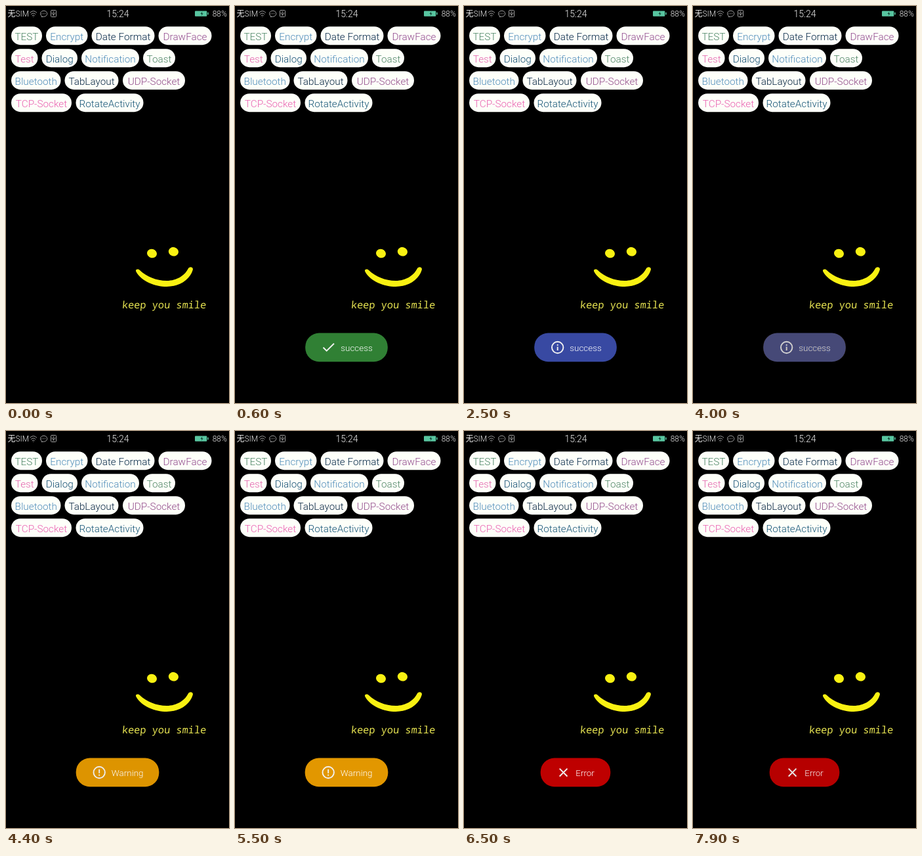
An HTML page for the animation above (8000 ms loop, 340x604 px).

```html
<!DOCTYPE html>
<html lang="en">
<head>
<meta charset="utf-8">
<title>Toast demo</title>
<style>
  html, body { margin: 0; width: 100%; height: 100%; overflow: hidden; background: #000; }
  svg { display: block; width: 340px; height: 604px; font-family: Roboto, "Noto Sans CJK SC", "Noto Sans CJK", sans-serif; font-weight: 300; }
  #chips { font-size: 15.3px; text-anchor: middle; }
  #chips rect { fill: #fdfff9; }
  .status { fill: #f0f0f0; font-size: 12px; }
  .icons { fill: none; stroke: #a0a0a0; stroke-linecap: round; }
  .motto { font: 500 15.3px "Noto Sans Mono", "DejaVu Sans Mono", monospace; fill: #e8e552; }
  .toast { opacity: 0; font-size: 13.4px; }
  .toast text { fill: #fff; }
  .toast path, .toast circle { fill: none; stroke: #f2f2f2; stroke-width: 1.9; }
</style>
</head>
<body>
<svg viewBox="0 0 340 604">
  <rect width="340" height="604"/>

  <g class="status">
    <text x="2.5" y="16.2">无SIM</text>
    <text x="170.5" y="17" font-size="14" text-anchor="middle">15:24</text>
    <text x="314.7" y="16.4">88%</text>
  </g>
  <g class="icons">
    <path d="M36.7 10q5-5 10 0M38.4 12.4q3.3-3 6.6 0M40.1 14.6q1.6-1.4 3.2 0M41.7 16.4h.01"/>
    <path d="M54.6 15.4a5.2 4.5 0 1 1 2.7.8l-2.9.3z"/>
    <path d="M54.8 11.7h.01M57.3 11.7h.01M59.8 11.7h.01" stroke-width="1.2"/>
    <rect x="68.5" y="6.5" width="8" height="10" rx="1"/>
    <path d="M72.5 8.5v6M70.5 10.5v1.5l2 1.3 2-1.3v-1.5" stroke-width=".9"/>
  </g>
  <rect x="288" y="7.4" width="18.3" height="8.4" rx="1" fill="#58c5a0"/>
  <rect x="307.2" y="9.7" width="1.5" height="3.6" fill="#58c5a0"/>
  <path d="M299.400 8.400l-2.900 3.500h2l-.7 2.900 2.900-3.500h-2z" fill="#0c3a2e"/>

  <g id="chips"></g>

  <g fill="#f9f112">
    <ellipse cx="222.5" cy="376.5" rx="7.6" ry="6.6" transform="rotate(15 222.5 376.5)"/>
    <ellipse cx="255.4" cy="373.7" rx="7.6" ry="6.8" transform="rotate(15 255.4 373.7)"/>
    <path d="M198.5 404.5C207 419 227 427 245 427C266 427 281 415 284.8 401.5C286 397 279.5 395.5 277.5 400C272 411 259 418 245 418C229 418 214 411.5 204 402C200.5 399 196.5 401 198.5 404.5Z"/>
  </g>
  <text class="motto" transform="translate(176.5 460) skewX(-5)">keep you smile</text>

  <g class="toast">
    <rect x="107.2" y="497.6" width="125.6" height="43.6" rx="21" fill="#308034"/>
    <path d="M134.5 519.5l5.2 5.2 11.3-11.2"/>
    <text x="161.3" y="525">success</text>
  </g>
  <g class="toast">
    <rect x="107.2" y="497.6" width="125.6" height="43.6" rx="21" fill="#3849a2"/>
    <circle cx="142.7" cy="519.5" r="8.7"/>
    <path d="M142.7 518.5v5.5M142.7 514.7v2"/>
    <text x="161.3" y="525">success</text>
  </g>
  <g class="toast">
    <rect x="106.7" y="497.6" width="126.6" height="43.6" rx="21" fill="#e29700"/>
    <circle cx="142.2" cy="519.5" r="8.7"/>
    <path d="M142.2 514.7v6M142.2 522.5v2"/>
    <text x="160.8" y="525">Warning</text>
  </g>
  <g class="toast">
    <rect x="116.7" y="497.6" width="106.6" height="43.6" rx="21" fill="#be0000"/>
    <path d="M145.7 513.7l11.8 11.8M157.5 513.7l-11.8 11.8"/>
    <text x="170.3" y="525">Error</text>
  </g>
</svg>
<script>
  const LOOP = 8000, FADE = 500, TICK = 100;

  // label, left, right, colour
  const rows = [
    [['TEST', 8, 55, '#4c8566'], ['Encrypt', 61, 124.5, '#4f8cba'], ['Date Format', 130.5, 226.5, '#062848'], ['DrawFace', 232.5, 313.5, '#924a8e']],
    [['Test', 8, 48.5, '#e463ac'], ['Dialog', 54.5, 109, '#134e74'], ['Notification', 115, 203, '#4f8cba'], ['Toast', 209, 258, '#4f8566']],
    [['Bluetooth', 8, 83.5, '#4f8cba'], ['TabLayout', 89.5, 171.5, '#062442'], ['UDP-Socket', 178, 273, '#924a8a']],
    [['TCP-Socket', 8, 100, '#ea60b0'], ['RotateActivity', 106.5, 209.5, '#145476']]
  ];
  document.getElementById('chips').innerHTML = rows.map((row, i) => {
    const y = 31.2 + i * 34;
    return row.map(([label, left, right, color]) =>
      `<rect x="${left}" y="${y}" width="${right - left}" height="28" rx="14"/>` +
      `<text x="${(left + right) / 2}" y="${y + 20.3}" fill="${color}">${label}</text>`).join('');
  }).join('');

  // fade-in start, fade-out start
  const times = [[67, 1800], [1967, 3810], [3967, 5790], [5830, 7800]];
  const toasts = document.querySelectorAll('.toast');
  const progress = (t, start) => Math.min(1, Math.max(0, (t - start) / FADE));

  function draw() {
    // the fades advance in 100 ms steps
    const t = Math.floor(performance.now() % LOOP / TICK) * TICK;
    times.forEach(([show, hide], i) => {
      const fadeIn = 1 - (1 - progress(t, show)) ** 2;
      const fadeOut = 1 - progress(t, hide) ** 2;
      toasts[i].style.opacity = fadeIn * fadeOut;
    });
    requestAnimationFrame(draw);
  }
  draw();
</script>
</body>
</html>
```
